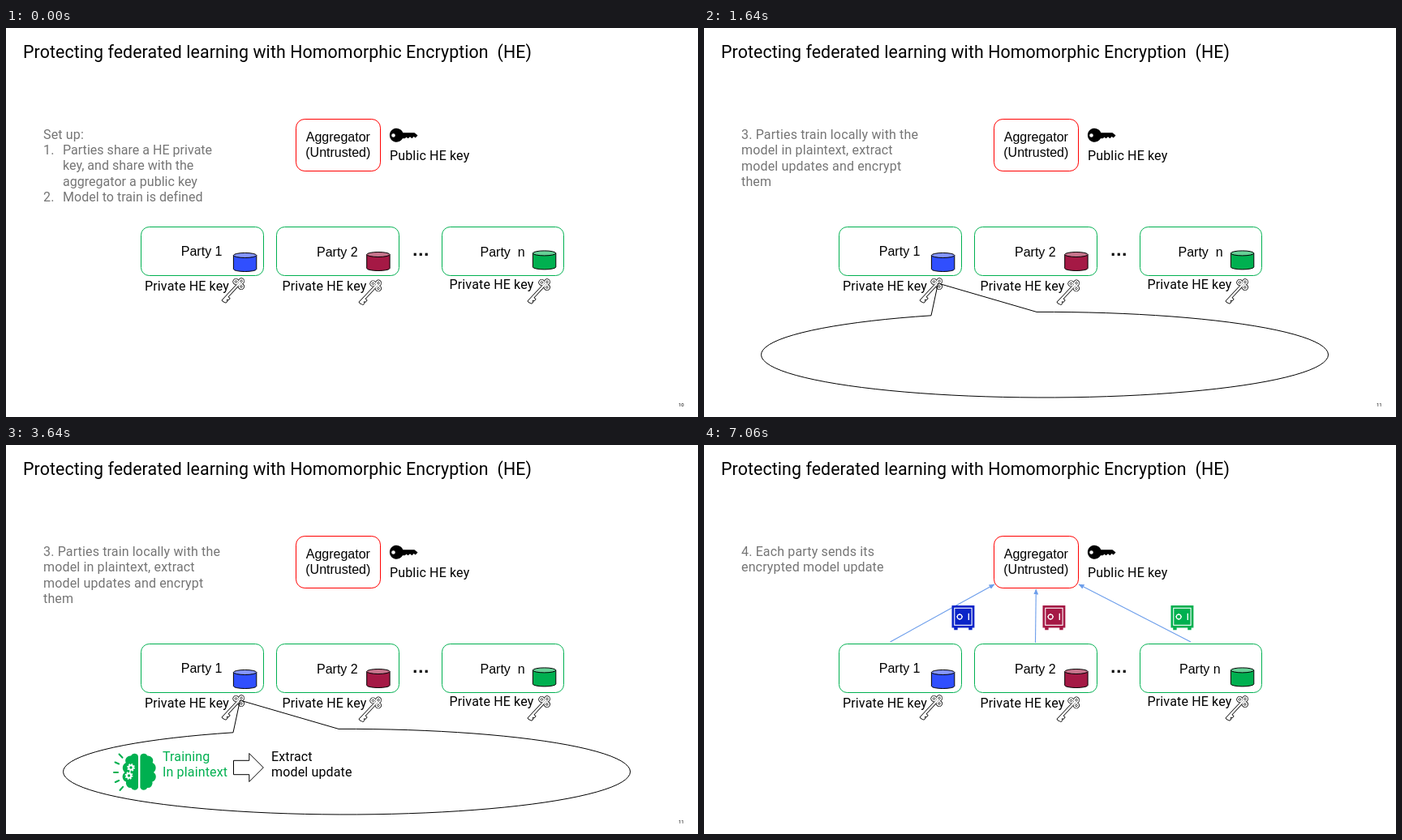
An HTML page that plays this animation: 853x480 px, repeating every 8 s.

```html
<!DOCTYPE html>
<html lang="en">
<head>
<meta charset="utf-8">
<title>Federated learning with Homomorphic Encryption</title>
<style>
  html, body { margin: 0; width: 100%; height: 100%; overflow: hidden; background: #fff; }
  svg { display: block; width: 100%; height: 100%; }
  text { white-space: pre; font: 16px Roboto, sans-serif; letter-spacing: .15px; }
  .title { font-size: 21.33px; letter-spacing: .1px; }
  .node { font: 16px "Liberation Sans", Arial, sans-serif; letter-spacing: 0; }
  .dots { font: bold 22px "Liberation Sans", Arial, sans-serif; letter-spacing: 0; }
  .page { font-size: 6px; letter-spacing: 0; }
  .note { fill: #757575; }
  .list { letter-spacing: .03px; }
  .good { fill: #00b050; }
  .secret { fill: #d12765; }
  .line { fill: none; stroke: #000; }
</style>
</head>
<body>
<svg id="stage" viewBox="0 0 853 480">
  <defs>
    <g id="keyShape" stroke-linejoin="round">
      <circle cx="-5" r="3.2"/>
      <circle cy="-4.4" r="3.2"/>
      <circle cy="4.4" r="3.2"/>
      <path d="M-3 1.2H28.4V-1.2L27.4 -4H24.8V-2.6H23V-4H20.4V-1.2H-3Z"/>
    </g>
    <g id="keyHoles" class="line" stroke-width=".7">
      <circle cx="-5" r="1.3"/>
      <circle cy="-4.4" r="1.3"/>
      <circle cy="4.4" r="1.3"/>
    </g>
    <path id="halfBrain" d="M165.4 384.5a4.7 4.3 0 0 1 9-1a6 6 0 0 1 6.2 8.6a7 7 0 0 1 1.4 11.8
      a6.6 6.6 0 0 1-1.6 11.6a6 6 0 0 1-6.2 7.6a4.7 4.4 0 0 1-8.8-.6Z"/>
    <g id="gear" fill="none" stroke="#fff">
      <circle r="4.1" stroke-width="1.7" stroke-dasharray="1.61 1.61"/>
      <circle r="2.7" stroke-width="2"/>
    </g>
    <g id="safe">
      <path d="M0 0H41V40.5H37V44.5H30.5V40.5H10.5V44.5H4V40.5H0Z"/>
      <g fill="none" stroke="#fff" stroke-width="1.6">
        <rect x="4.8" y="4.8" width="31.4" height="31"/>
        <path d="M30.6 14.5V26.5" stroke-width="2"/>
        <circle cx="14.2" cy="20.5" r="4.2" stroke-width="1.7"/>
        <path d="M14.2 14.8v2M14.2 24.2v2M8.5 20.5h2M17.9 20.5h2" stroke-width="2"/>
      </g>
    </g>
    <path id="blockArrow" class="line" d="M280.5 389.3H299.8V380.5L317.3 398L299.8 415.5V406.7H280.5Z"/>
    <marker id="head" markerUnits="userSpaceOnUse" markerWidth="7" markerHeight="6" refX="6.5" refY="3" orient="auto">
      <path d="M0 0L7 3L0 6Z" fill="#6d9eeb"/>
    </marker>
  </defs>
</svg>
<script>
const LOOP = 8000;
const SETUP = 0, TRAIN = 500, BUBBLE = 1640, LEARN = 2640, EXTRACT = 3640, ENCRYPT = 4640, SEND = 5640;
const stage = document.getElementById('stage');
const scenes = [];

const text = (x, y, str, cls = '', anchor = 'start') =>
  `<text x="${x}" y="${y}" class="${cls}" text-anchor="${anchor}">${str}</text>`;

const lines = (x, y, rows, cls) =>
  rows.map((row, i) => text(x, y + Math.round(i * 19.3), row, cls)).join('');

const box = (x, y, w, h, r, color) =>
  `<rect x="${x}" y="${y}" width="${w}" height="${h}" rx="${r}" fill="none" stroke="${color}"/>`;

const drum = (x, y, body, top) =>
  `<g fill="${body}" stroke="#000">
    <path d="M${x} ${y + 3}v17a14.2 3 0 0 0 28.4 0v-17"/>
    <ellipse cx="${x + 14.2}" cy="${y + 3}" rx="14.2" ry="3" fill="${top}"/>
  </g>`;

// The stroked copy lies under a plain one, so the parts merge into one outline.
const privateKey = (x, y) =>
  `<g transform="translate(${x} ${y}) rotate(133)">
    <use href="#keyShape" stroke="#000" stroke-width="1.5"/>
    <use href="#keyShape" fill="#fff"/>
    <use href="#keyHoles"/>
  </g>`;

const safe = (x, y, color, scale = 1) =>
  `<use href="#safe" transform="translate(${x} ${y}) scale(${scale})" fill="${color}"/>`;

const sendArrow = (x1, y1, x2, y2) =>
  `<path d="M${x1} ${y1}L${x2} ${y2}" stroke="#6d9eeb" stroke-width="1.1" marker-end="url(#head)"/>`;

function scene(from, to, content) {
  const g = document.createElementNS('http://www.w3.org/2000/svg', 'g');
  g.innerHTML = content;
  stage.append(g);
  scenes.push({ g, from, to });
}

const publicKey =
  `<path fill-rule="evenodd" d="M489.3 129.2H503.5L507.5 132.4L504.8 135.4L502.6 134L500.4 136.2L498 134.2L495.6 136.2
    L493.6 134.8L491.6 136.2H488.9A8.5 8.5 0 1 1 489.3 129.2Z
    M475.2 132.5a2.3 2.3 0 1 0 4.6 0a2.3 2.3 0 1 0-4.6 0Z"/>`;

const brain =
  `<g fill="#00b050">
    <use href="#halfBrain"/>
    <use href="#halfBrain" transform="translate(328.4) scale(-1 1)"/>
  </g>
  <use href="#gear" x="154" y="398"/>
  <use href="#gear" x="151.5" y="408"/>
  <path d="M139.5 381.5l4 4.2M134.5 391.5l4.6 2M133 404h5M134.8 416l4.4-2M140.5 426l3.6-4.2"
    stroke="#00b050" stroke-width="2" stroke-linecap="round"/>`;

scene(0, LOOP,
  text(21, 37, 'Protecting federated learning with Homomorphic Encryption  (HE)', 'title') +
  box(357.5, 112.5, 104, 64, 10.7, '#f00') +
  text(409.3, 140, 'Aggregator', 'node', 'middle') +
  text(409.3, 159, '(Untrusted)', 'node', 'middle') +
  publicKey +
  [[166.5, 151], [333.5, 151], [537.5, 150]].map(([x, w]) => box(x, 245.5, w, 60, 10, '#00b050')).join('') +
  text(473, 163, 'Public HE key') +
  text(215.8, 281, 'Party 1', 'node') +
  text(383, 282, 'Party 2', 'node') +
  text(500.3, 281, '…', 'dots') +
  drum(280.4, 277.5, '#304ffe', '#8596ff') +
  drum(444.7, 276.5, '#a51945', '#c8758d') +
  drum(649.4, 274.9, '#00b050', '#66d096') +
  text(171, 324, 'Private HE key') +
  text(340.5, 324, 'Private HE key') +
  text(546.5, 322, 'Private HE key') +
  privateKey(286.7, 316) + privateKey(455.7, 318.4) + privateKey(663.6, 317));

scene(SETUP, TRAIN,
  text(46, 137, 'Set up:', 'note') +
  text(46, 156, '1.', 'note') +
  text(46, 214, '2.', 'note') +
  lines(70, 156, ['Parties share a HE private', 'key, and share with the', 'aggregator a public key', 'Model to train is defined'], 'note list') +
  text(829, 467, '10', 'page'));

scene(TRAIN, SEND,
  lines(46, 137, ['3. Parties train locally with the', 'model in plaintext, extract', 'model updates and encrypt', 'them'], 'note') +
  text(829, 467, '11', 'page'));

scene(SETUP, SEND, text(584.5, 282, 'Party  n', 'node'));

scene(BUBBLE, SEND,
  '<path class="line" d="M288.5 315L410 350.4A349.5 52.8 0 1 1 280 354.8Z"/>');

scene(LEARN, SEND, brain + lines(193, 390, ['Training', 'In plaintext'], 'good'));

scene(EXTRACT, SEND,
  '<use href="#blockArrow"/>' + lines(327, 390, ['Extract', 'model update']));

scene(ENCRYPT, SEND,
  '<use href="#blockArrow" x="153"/>' +
  text(480, 390, 'Encrypt model update', 'secret') +
  safe(644, 376.3, '#0a3cd0'));

scene(SEND, LOOP,
  lines(46, 137, ['4. Each party sends its', 'encrypted model update'], 'note') +
  text(586, 282, 'Party n', 'node') +
  sendArrow(229.5, 243, 358, 172) +
  sendArrow(408.5, 244, 409.3, 178) +
  sendArrow(600, 243, 462, 172) +
  safe(305.5, 198, '#0a24c8', .68) +
  safe(417.5, 198, '#a51945', .68) +
  safe(575.5, 198, '#00b050', .68));

function draw(t) {
  for (const { g, from, to } of scenes)
    g.style.display = t >= from && t < to ? '' : 'none';
}

let start;
function tick(now) {
  start ??= now;
  draw((now - start) % LOOP);
  requestAnimationFrame(tick);
}
draw(0);
requestAnimationFrame(tick);
</script>
</body>
</html>
```
